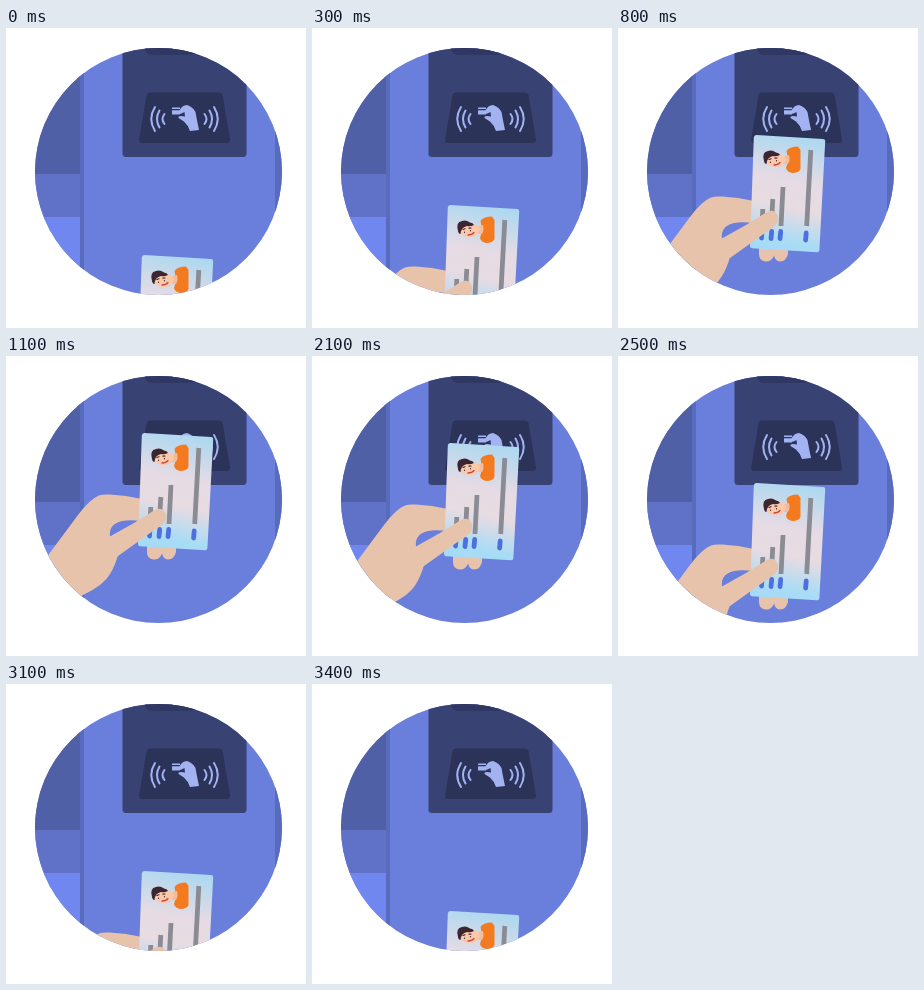
Animation of 300 by 300 pixels, one loop 4.4 s. Source, as an HTML page:

```html
<!DOCTYPE html>
<html lang="en">
<head>
<meta charset="utf-8">
<title>Card reader</title>
<style>
  html, body { margin: 0; width: 100%; height: 100%; overflow: hidden; background: #fff; }
  svg { display: block; width: 100vw; height: 100vh; }
</style>
</head>
<body>
<svg viewBox="0 0 300 300">
  <defs>
    <clipPath id="porthole"><circle cx="152.5" cy="143.5" r="123.5"/></clipPath>
    <linearGradient id="sheen" gradientUnits="userSpaceOnUse" x1="182" y1="76" x2="158" y2="193">
      <stop offset="0" stop-color="#a9d8f1"/>
      <stop offset=".4" stop-color="#e6dbe4"/>
      <stop offset=".62" stop-color="#e8dbe2"/>
      <stop offset=".9" stop-color="#a9dcf5"/>
      <stop offset="1" stop-color="#a5daf6"/>
    </linearGradient>
  </defs>
  <g clip-path="url(#porthole)">
    <!-- machine -->
    <path fill="#6a7fdb" d="M20 10H290V280H20z"/>
    <path fill="#5060a6" d="M20 10H74V146H20z"/>
    <path fill="#5f72c7" d="M20 146H74V189H20z"/>
    <path fill="#7187f0" d="M20 189H74V280H20z"/>
    <path fill="#596bbd" d="M74 10H78V280H74zM269 10H290V280H269z"/>
    <rect x="116.500" y="0" width="124" height="129" rx="3.500" fill="#384273"/>
    <path fill="#2f3862" d="M139 10H191V22Q189 27 184 27H147Q141 27 139 22z"/>
    <path fill="#2c3359" d="M144 64.500H213Q216 64.500 216.600 67.500L224 111Q224.400 115 221 115H136Q132.600 115 133.200 111L140.500 67.500Q141 64.500 144 64.500z"/>

    <!-- contactless symbol -->
    <g id="waves" fill="none" stroke="#a3b3f2" stroke-width="2" stroke-linecap="round">
      <path d="M149 79Q141.500 91 149 103M153.500 82.500Q148.500 91 153.500 99.500M158.500 86Q154.500 91 158.500 96"/>
      <path d="M208 79Q215.500 91 208 103M203.500 82.500Q208.500 91 203.500 99.500M198.500 86Q202.500 91 198.500 96"/>
    </g>
    <path fill="#a3b3f2" d="M166 79.500H174V81H166zM166 82.200H174V86.500H166zM173 83Q176 77 181 77Q187 79 189.500 84Q190.500 90 193 102L184 103Q182 97 178 93.500L172.500 90Q172 88 175 88L179 88.500L178.500 84L174.500 86z"/>

    <!-- hand and card, drawn at the top of their travel -->
    <g id="mover">
      <g fill="#e8c3ab">
        <path d="M10 242L43 198L72 159Q84 143 93 139.500Q97 138 104 138.500Q120 139 136 143V165.500C118 162 102 166 104 180L112 199Q109 210 104 218Q98 229 77 239L40 265z"/>
        <path d="M141 188H156V198Q153 204 147.500 203.500Q141 203 141 196zM156 188H170V196Q168 203.500 162 203.500Q157 203 156 197z"/>
      </g>
      <path fill="url(#sheen)" d="M138.500 77L205 80.900Q207.400 81 207.200 83.500L201.400 192Q201.200 194.300 199 194.200L134 190.300Q131.800 190.100 132 188L135.800 79.500Q136 76.900 138.500 77z"/>

      <!-- portrait -->
      <path fill="#f47a20" d="M168.500 93Q171 88.500 180 88.500L182.500 92V111Q181 115 174 115Q169 114 168 110Q171 103 168.500 93z"/>
      <path fill="#f3bd9d" d="M163 99L171 97Q172.500 102 170 106L163 106z"/>
      <path fill="#fac9a9" d="M147 100Q149 95 158 95.500Q167 96 168 101.500Q167 108 158 109Q149 109.500 147 100z"/>
      <path fill="#3b2530" d="M146 103Q143.500 94 150 93Q154 91.500 158 94.500Q161 94.500 162 97Q158 99 155 98Q149 99 148.500 106Q146.500 106 146 103z"/>
      <path fill="none" stroke="#3b2530" stroke-width="1.200" stroke-linecap="round" d="M151 101.500L153 100.800M157 100.200L159 100M152.500 104V104.300M158.500 102.500V102.800"/>
      <path fill="none" stroke="#c84a45" stroke-width="1.300" stroke-linecap="round" d="M156 107Q160 107 162 104.500"/>

      <!-- printed lines -->
      <path fill="none" stroke="#8b8b94" stroke-width="4.800" d="M192.800 92L188.700 168M165 129L163 168M154.800 141L153.300 168M144.800 151L144 168"/>
      <path fill="none" stroke="#4c70df" stroke-width="4.800" stroke-linecap="round" d="M144 173L143.500 180M153.700 173.500L153 180.500M162.700 173.500L162 180.500M188.200 175L187.600 182"/>

      <path fill="#e8c3ab" d="M103 181L128 167L148 154.500Q153 151.500 157 154Q161 157 160 163Q159 167 154 170L112 200L96 205z"/>
    </g>
  </g>
</svg>
<script>
  const LOOP = 4400, TICK = 100, STEP = 10, STEPS = 15;
  const mover = document.getElementById("mover");

  // Steps below the reader; the card rises quickly, rests, then sinks more slowly.
  function depth(t) {
    if (t < 1100) return STEPS - Math.floor((t + 71) / 71.4);
    if (t < 2100) return 0;
    return Math.min(STEPS, Math.floor((t - 1985) / 93));
  }

  function draw(now) {
    const t = Math.floor(now % LOOP / TICK) * TICK;
    mover.setAttribute("transform", `translate(0 ${depth(t) * STEP})`);
    requestAnimationFrame(draw);
  }
  draw(performance.now());
</script>
</body>
</html>
```
